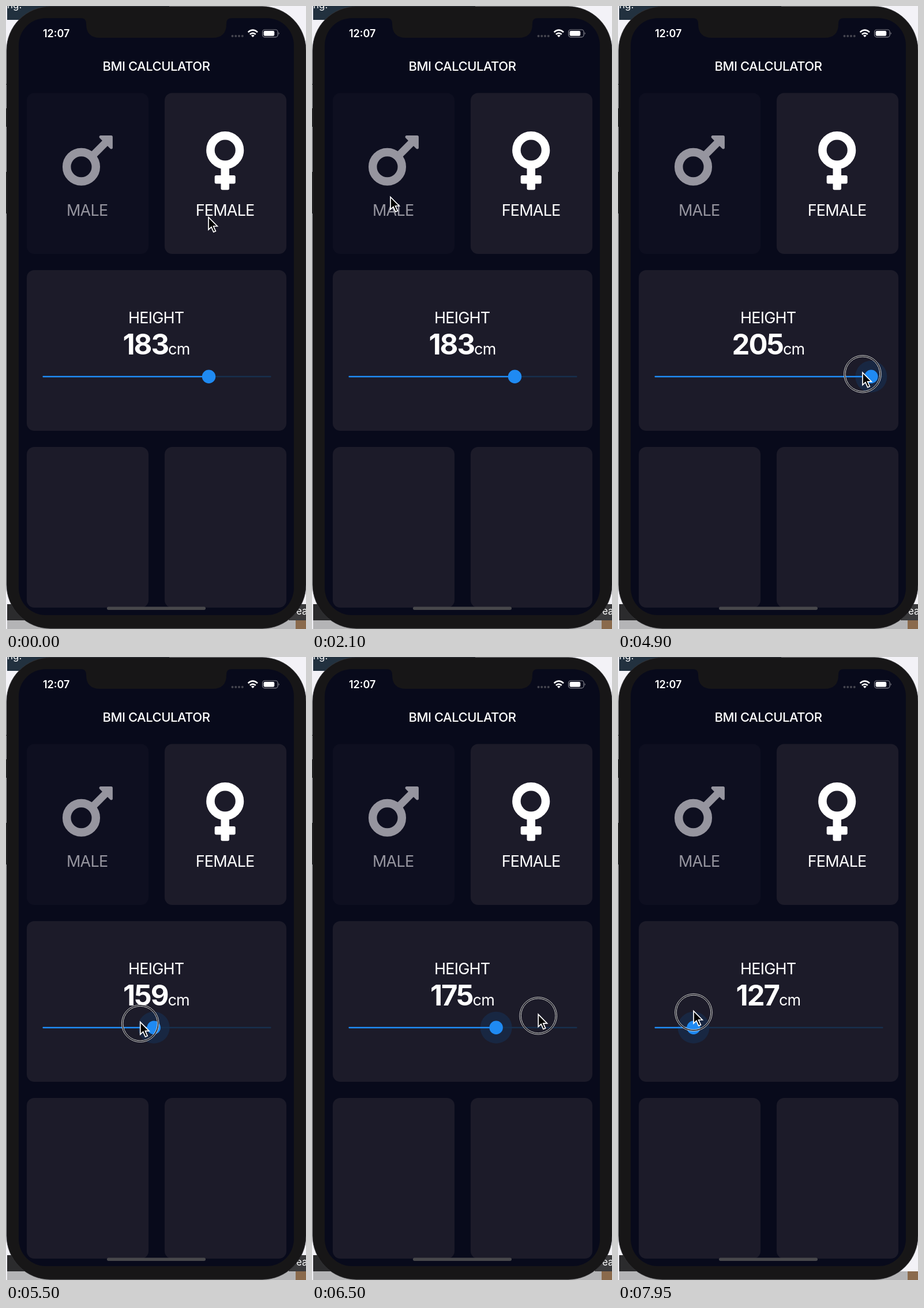
An HTML page for the animation above (8 s loop, 520 px wide and 1078 px high).

```html
<!DOCTYPE html>
<html lang="en">
<head>
<meta charset="utf-8">
<title>BMI Calculator</title>
<style>
  html, body { margin: 0; width: 520px; height: 1078px; overflow: hidden; background: #f3f2f7; }
  svg { display: block; }
  text { font-family: Inter, Roboto, sans-serif; fill: #fff; }
  .mid { text-anchor: middle; }
  .label { font-size: 27px; letter-spacing: -.8px; }
  .card { fill: #1c1b29; }
  .pick { color: #fff; }
  .pick text { fill: currentColor; }
  .off { color: #96959f; }
  .off .card { fill: #0e0f20; }
  .ink { fill: currentColor; }
  .line { fill: none; stroke: currentColor; stroke-width: 14.5; }
</style>
</head>
<body>
<svg width="520" height="1078" viewBox="0 0 520 1078">
  <!-- desktop behind the phone -->
  <rect width="520" height="1078" fill="#f3f2f7"/>
  <rect x="2" width="281" height="24" fill="#22313f"/>
  <text x="2" y="4" font-size="17">ng:</text>
  <rect x="2" y="1035" width="180" height="28" fill="#2b2b2d"/>
  <rect x="2" y="1063" width="500" height="15" fill="#b4b4b6"/>
  <rect x="502" y="1063" width="18" height="15" fill="#8a6a4c"/>
  <g id="behind">
    <rect x="490" y="1035" width="30" height="28" fill="#3a3a3c"/>
    <text x="503" y="1053" font-size="17" fill="#ddd">ea</text>
  </g>
  <path d="M0 135h2v1h-2zM0 177h2v32h-2zM0 287h2v72h-2z" fill="#222"/>

  <!-- phone -->
  <rect x="1" y=".8" width="519" height="1076.4" rx="76" fill="#171617" stroke="#38383b" stroke-width=".8"/>
  <rect x="22" y="21" width="477" height="1033" rx="47" fill="#080a1b"/>
  <path d="M130 20v1q9 0 9 9v1q0 24 24 24h195q24 0 24-24v-1q0-9 9-9v-1z" fill="#171617"/>

  <!-- status bar -->
  <text x="64" y="54" font-size="18" font-weight="600">12:07</text>
  <path d="M392.500 52h18" stroke="#464650" stroke-width="4" stroke-linecap="round" stroke-dasharray="0 5.750"/>
  <path d="M419.600 45.400q8.200-7.400 16.400 0M422.800 49q5-4.400 10 0" fill="none" stroke="#fff" stroke-width="2.600"/>
  <path d="M427.800 54l-3-3q3-2.200 6 0z" fill="#fff"/>
  <rect x="444.600" y="41" width="26.500" height="12.800" rx="3.800" fill="none" stroke="#85858d" stroke-width="1.200"/>
  <rect x="446.600" y="43" width="18.600" height="8.800" rx="2.200" fill="#fff"/>
  <path d="M472.600 45.200q2.400 2.200 0 4.400z" fill="#85858d"/>

  <text class="mid" x="260.500" y="112" font-size="22" font-weight="500" letter-spacing="-.5">BMI CALCULATOR</text>

  <g id="male" class="pick off">
    <rect class="card" x="36" y="150.500" width="211" height="278.500" rx="13"/>
    <circle class="line" cx="130.500" cy="278.200" r="25.300"/>
    <path class="line" d="M149 260l26-26" style="stroke-width:13"/>
    <path class="ink" d="M164 226.600h18.400v18.400z" stroke="currentColor" stroke-width="5" stroke-linejoin="round"/>
    <text class="mid label" x="140.700" y="363">MALE</text>
  </g>
  <g id="female" class="pick">
    <rect class="card" x="275" y="150.500" width="211" height="278.500" rx="13"/>
    <circle class="line" cx="379.700" cy="249.500" r="25.300"/>
    <rect class="ink" x="372.500" y="278" width="14.500" height="40.200" rx="2.700"/>
    <rect class="ink" x="361.700" y="292.900" width="36" height="14.500" rx="2.700"/>
    <text class="mid label" x="379.600" y="363">FEMALE</text>
  </g>

  <rect class="card" x="36" y="457" width="450" height="278" rx="13"/>
  <rect class="card" x="36" y="763" width="211" height="278" rx="13"/>
  <rect class="card" x="275" y="763" width="211" height="278" rx="13"/>
  <rect x="175" y="1039.500" width="171" height="5.500" rx="2.700" fill="#47474b"/>

  <text class="mid label" x="260.300" y="549">HEIGHT</text>
  <text class="mid" x="260.500" y="603"><tspan id="num" font-size="49" font-weight="700" letter-spacing="-2">183</tspan><tspan class="label">cm</tspan></text>

  <!-- slider -->
  <circle id="halo" cy="641.200" fill="#182742"/>
  <rect x="63.500" y="640" width="396" height="2.400" rx="1" fill="#172f4d"/>
  <rect id="fill" x="63.500" y="640" height="2.400" rx="1" fill="#1f8af2"/>
  <circle id="knob" cy="641.200" r="11.700" fill="#1f8af2"/>

  <!-- pointer -->
  <g id="pointer">
    <g id="ring" fill="none" stroke="#d4d4d4">
      <circle cy="3" r="31" stroke="#14141c" stroke-width="2"/>
      <circle cy="3" r="32.300"/><circle cy="3" r="29.800"/>
    </g>
    <path d="M0 .5V22l4.900-4.600 3.900 8.700 3.600-1.600-3.800-8.500h6.700z" fill="#000" stroke="#fff" stroke-width="1.700"/>
  </g>
</svg>
<script>
const LOOP = 8000, STEP = 50, PRESS = 4450, LAG = 110;
const START = 63.3, PX_PER_CM = 3.95, MIN = 110;
const HOME = [351, 365];

// pointer moves: start, end, x, y
const moves = [
  [300, 450, 140, 338], [900, 1000, 213, 340], [1100, 1300, 376, 324],
  [1850, 2100, 136, 330], [2450, 2800, 55, 366], [3150, 3550, 325, 407],
  [3900, 4400, 351.5, 638],
  // dragging the slider
  [PRESS, 4750, 440, 634], [4750, 5600, 225.5, 631], [5600, 6093, 178, 626],
  [6093, 6659, 440, 616], [6659, 7666, 131, 612]
];
const maleOn = [[700, 1650], [2950, 3800]];

const $ = id => document.getElementById(id);
const clamp = v => Math.min(1, Math.max(0, v));
const ease = u => (1 - Math.cos(Math.PI * u)) / 2;

function pointer(t) {
  let [x, y] = HOME;
  for (const [from, to, nx, ny] of moves) {
    const e = ease(clamp((t - from) / (to - from)));
    x += (nx - x) * e;
    y += (ny - y) * e;
  }
  return [x, y];
}

function draw(t) {
  const male = maleOn.some(([from, to]) => t >= from && t < to);
  $('male').classList.toggle('off', !male);
  $('female').classList.toggle('off', male);

  // the knob trails the pointer
  const [knob] = pointer(Math.max(PRESS, t - LAG));
  $('num').textContent = Math.round(MIN + (knob - START) / PX_PER_CM);
  $('fill').setAttribute('width', knob - 63.5);
  $('knob').setAttribute('cx', knob);
  $('halo').setAttribute('cx', knob);
  $('halo').setAttribute('r', 27.5 * clamp((t - PRESS) / 150));

  $('pointer').setAttribute('transform', `translate(${pointer(t)})`);
  $('ring').style.display = t >= PRESS ? '' : 'none';
  $('behind').style.display = t >= 7350 ? 'none' : '';
}

const begin = performance.now();
function tick() {
  const t = (performance.now() - begin) % LOOP;
  draw(Math.floor(t / STEP) * STEP);
  requestAnimationFrame(tick);
}
tick();
</script>
</body>
</html>
```
